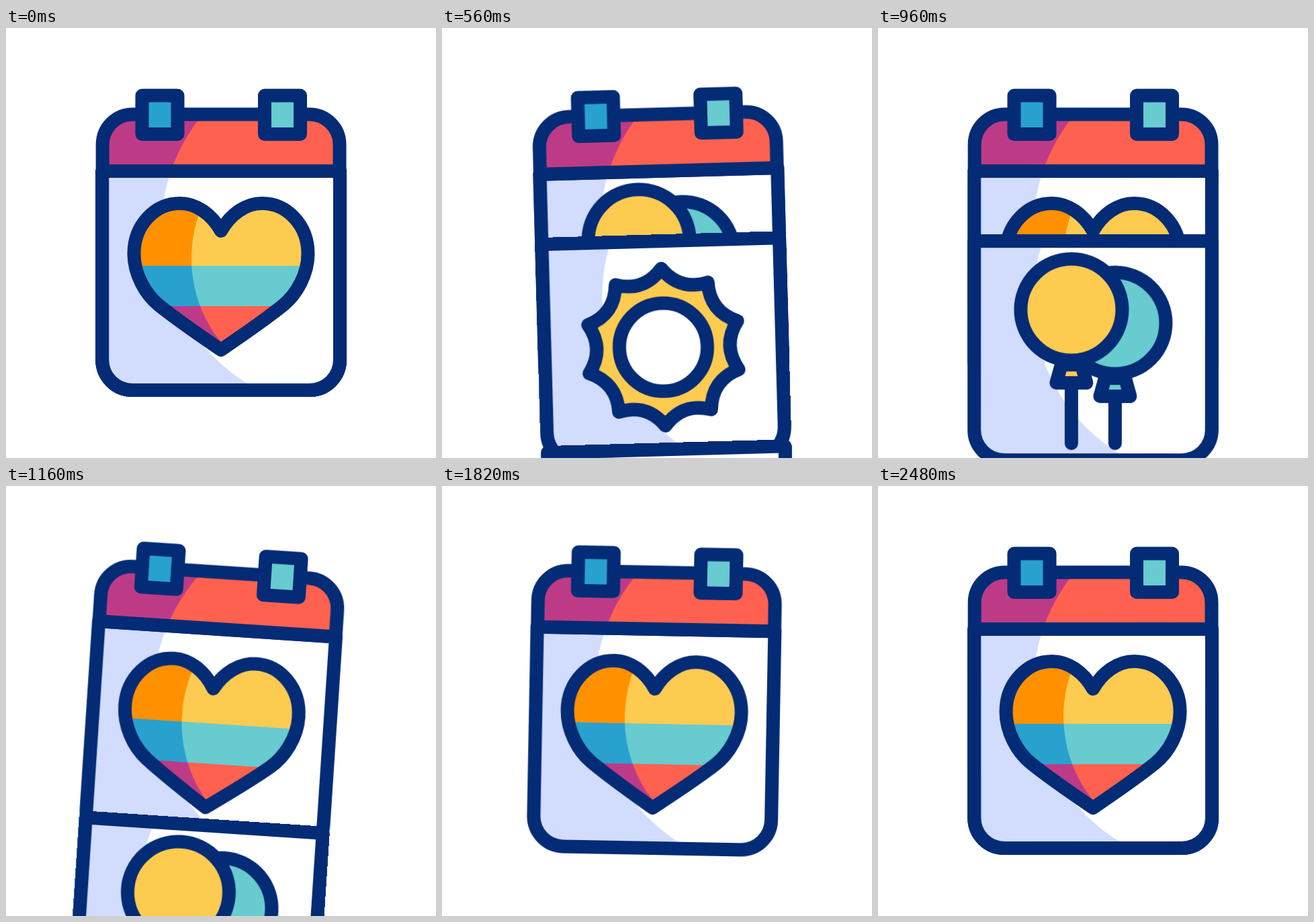
Animation, 640 px wide and 640 px high, one loop 3300 ms. Source, as an HTML page without scripts:

```html
<!DOCTYPE html>
<html lang="en">
<head>
<meta charset="utf-8">
<title>Swinging calendar</title>
<style>
  html, body { margin: 0; width: 100%; height: 100%; overflow: hidden; background: #fff; }
  svg { display: block; width: 100vw; height: 100vh; }

  .ink { fill: none; stroke: #042b75; stroke-width: 20; stroke-linejoin: round; stroke-linecap: round; }
  .yellow { fill: #fdcb50; }
  .teal { fill: #67cbd0; }
  .coral { fill: #ff6150; }
  .orange { fill: #ff9100; }
  .blue { fill: #28a1cf; }
  .purple { fill: #bd3b86; }
  .lavender { fill: #d2dcfd; }
  .white { fill: #fff; }

  .calendar, .page { animation: 3.3s cubic-bezier(.333, 0, .667, 1) infinite; }
  .calendar { transform-origin: 320px 129px; animation-name: swing; }
  .page { animation-name: fall; }
  .second { animation-delay: .34s; }
  .third { animation-delay: .74s; }

  @keyframes swing {
    0% { transform: rotate(0deg); }
    10.303% { transform: rotate(10deg); }
    22.424% { transform: rotate(-10deg); }
    33.333% { transform: rotate(5deg); }
    41.818% { transform: rotate(-5deg); }
    50.909% { transform: rotate(2.25deg); }
    63.636% { transform: rotate(-2.25deg); }
    75.758%, 100% { transform: rotate(0deg); }
  }

  /* Fallen pages return in stacking order, hidden behind the first one. */
  @keyframes fall {
    0% { transform: translateY(0); }
    22.424%, 60% { transform: translateY(486px); }
    60.01%, 100% { transform: translateY(0); }
  }
</style>
</head>
<body>
<svg viewBox="0 0 640 640">
  <defs>
    <path id="sheet" d="M143.3 213H496.9V494a45 45 0 0 1-45 45H188.3a45 45 0 0 1-45-45z"/>
    <path id="header" d="M143.7 213V173.5a45 45 0 0 1 45-45H451.5a45 45 0 0 1 45 45V213z"/>
    <path id="heart" d="M320 302C306 277 283 261 259 261C221 261 190.5 294 190.5 336C190.5 366 207 396 228 413C258 437 292 460 320 479C348 460 382 437 412 413C433 396 449.5 366 449.5 336C449.5 294 419 261 381 261C357 261 334 277 320 302z"/>
    <circle id="light" cx="500" cy="300" r="269"/>

    <clipPath id="sheetClip"><use href="#sheet"/></clipPath>
    <clipPath id="headerClip"><use href="#header"/></clipPath>
    <clipPath id="heartClip"><use href="#heart"/></clipPath>
    <clipPath id="heartLight"><circle cx="476" cy="343" r="200"/></clipPath>

    <g id="blank">
      <g clip-path="url(#sheetClip)">
        <use href="#sheet" class="lavender"/>
        <use href="#light" class="white"/>
      </g>
      <use href="#sheet" class="ink"/>
    </g>

    <g id="heartPage">
      <use href="#blank"/>
      <g clip-path="url(#heartClip)">
        <path class="orange" d="M180 250H460V354H180z"/>
        <path class="blue" d="M180 354H460V414H180z"/>
        <path class="purple" d="M180 414H460V490H180z"/>
        <g clip-path="url(#heartLight)">
          <path class="yellow" d="M180 250H460V354H180z"/>
          <path class="teal" d="M180 354H460V414H180z"/>
          <path class="coral" d="M180 414H460V490H180z"/>
        </g>
      </g>
      <use href="#heart" class="ink"/>
    </g>

    <g id="balloon">
      <path class="ink" style="fill:inherit" d="M-15 82H15L22.5 109H-22.5z"/>
      <circle class="ink" style="fill:inherit" r="75.5"/>
    </g>

    <g id="hook">
      <path class="ink" style="fill:inherit" d="M202.5 100.5h53v57.5h-53z"/>
    </g>
  </defs>

  <g class="calendar">
    <use href="#heartPage"/>

    <g class="page third">
      <use href="#blank"/>
      <path class="ink" d="M353 444V514M288 424V514"/>
      <use href="#balloon" class="teal" x="353" y="335"/>
      <use href="#balloon" class="yellow" x="288" y="315"/>
    </g>

    <g class="page second">
      <use href="#blank"/>
      <g transform="translate(320 371)">
        <path class="ink" style="fill:#fdcb50" d="M0-117Q26.9-82.7 68.8-94.7Q70.4-51.1 111.3-36.2Q87 0 111.3 36.2Q70.4 51.1 68.8 94.7Q26.9 82.7 0 117Q-26.9 82.7-68.8 94.7Q-70.4 51.1-111.3 36.2Q-87 0-111.3-36.2Q-70.4-51.1-68.8-94.7Q-26.9-82.7 0-117z"/>
        <circle class="ink" style="fill:#fff" r="65.5"/>
      </g>
    </g>

    <g class="page">
      <use href="#heartPage"/>
    </g>

    <g clip-path="url(#headerClip)">
      <use href="#header" class="purple"/>
      <use href="#light" class="coral"/>
    </g>
    <use href="#header" class="ink"/>
    <use href="#hook" class="blue"/>
    <use href="#hook" class="teal" x="182.5"/>
  </g>
</svg>
</body>
</html>
```
